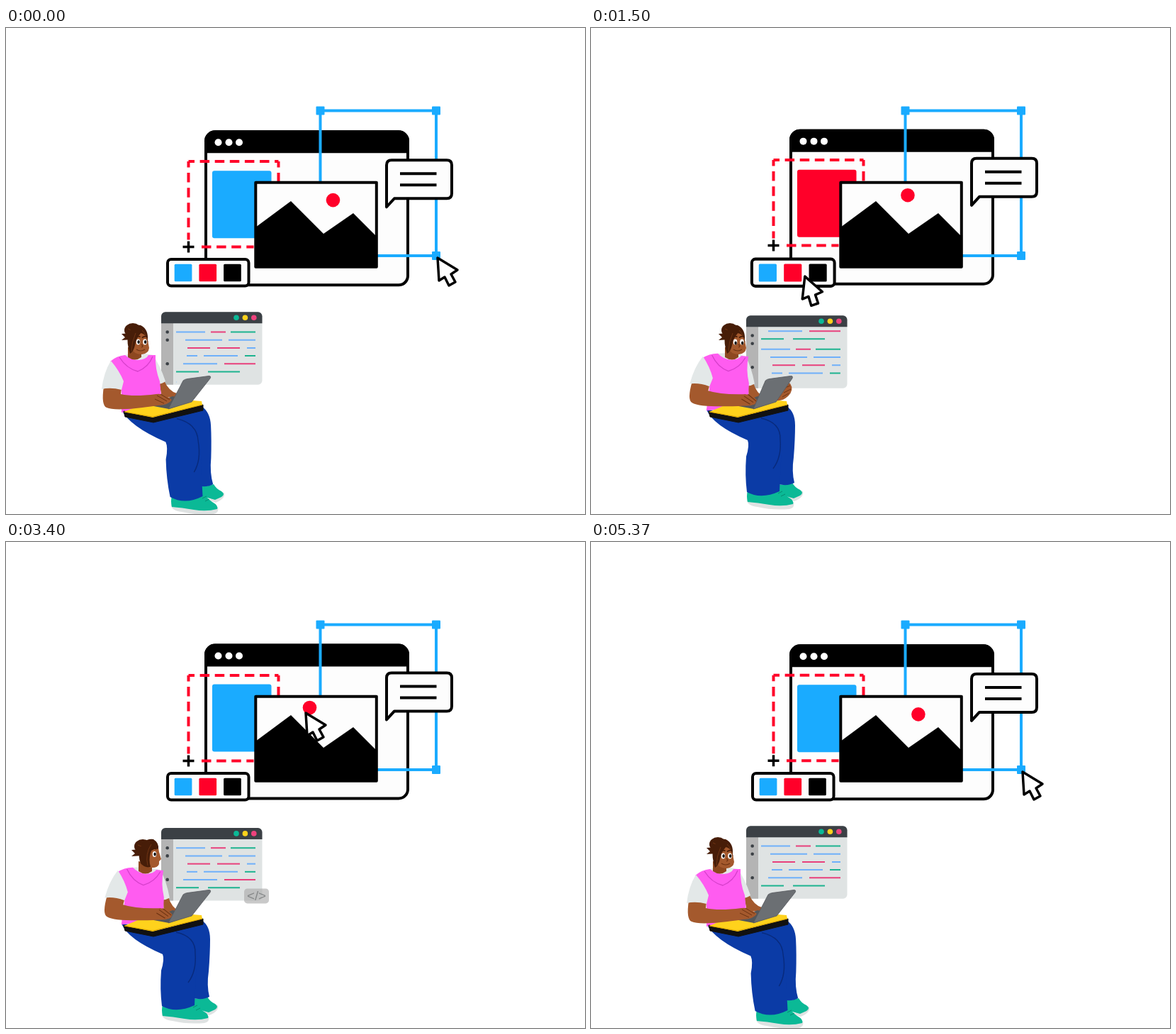
Write an HTML page with a canvas that moves like this. It is 817 by 685 pixels and loops after 5.41 s.

```html
<!DOCTYPE html>
<html lang="en">
<head>
<meta charset="utf-8">
<title>Design and code</title>
<style>
html, body { margin: 0; width: 100%; height: 100%; overflow: hidden; background: #fff; }
canvas { display: block; }
</style>
</head>
<body>
<canvas id="stage" width="817" height="685"></canvas>
<script>
const c = document.getElementById('stage').getContext('2d');
const LOOP = 5410;
const BLUE = '#1aabff', RED = '#ff0029', INK = '#000', PAPER = '#fdfdfd';
const SKIN = '#a4592d', SKIN_LINE = '#6b3212', HAIR = '#471d08', PINK = '#ff5cf0', PINK_LINE = '#d63fcb';
const SHIRT = '#e3e8e8', JEANS = '#0b3ba6', JEANS_LINE = '#082a7c', TEAL = '#0bb996', SOLE = '#dfe2e2';
const SLATE = '#3b4045', YELLOW = '#ffd21c';
const CODE = { b: '#6fb0fa', p: '#e8407c', g: '#1db38f' };

const unit = v => Math.min(1, Math.max(0, v));

// Eased 0 to 1 between two times
function ramp(t, from, to) {
  const k = unit((t - from) / (to - from));
  return k * k * (3 - 2 * k);
}

// Rises between a and b, falls between d and e
const hill = (t, a, b, d, e) => ramp(t, a, b) - ramp(t, d, e);

// Sway that repeats a whole number of times in the loop
const wave = (t, cycles, degrees = 0) => Math.cos(2 * Math.PI * (cycles * t / LOOP + degrees / 360));

function draw(d, fill, stroke, width = 4) {
  const p = new Path2D(d);
  if (fill) { c.fillStyle = fill; c.fill(p); }
  if (stroke) { c.strokeStyle = stroke; c.lineWidth = width; c.stroke(p); }
}

function box(x, y, w, h, r, fill, stroke, width = 4) {
  c.beginPath();
  c.roundRect(x, y, w, h, r);
  if (fill) { c.fillStyle = fill; c.fill(); }
  if (stroke) { c.strokeStyle = stroke; c.lineWidth = width; c.stroke(); }
}

function dot(x, y, rx, fill, ry = rx) {
  c.beginPath();
  c.ellipse(x, y, rx, ry, 0, 0, 7);
  c.fillStyle = fill;
  c.fill();
}

function at(x, y, paint, angle = 0, scale = 1) {
  c.save();
  c.translate(x, y);
  c.rotate(angle * Math.PI / 180);
  c.scale(scale, scale);
  paint();
  c.restore();
}

// Skews a drawing around a fixed point
function lean(x, y, down, across, stretch, paint) {
  c.save();
  c.translate(x, y);
  c.transform(1, down, across, stretch, 0, 0);
  c.translate(-x, -y);
  paint();
  c.restore();
}

function designWindow(t) {
  const fill = t < 850 || t >= 2650 ? BLUE : t < 1620 ? RED : INK;
  at(0, 158 + 3.3 * wave(t, 3), () => {
    box(282, -15, 285, 216, 13, PAPER, INK);
    box(280, -17, 289, 32, [15, 15, 0, 0], INK);
    for (const x of [299.5, 314.5, 329]) dot(x, 0, 5, '#fff');
    box(291, 40, 83.5, 95, 3, fill);
  });
}

function marquee(t) {
  at(257.5, 307.2 + 1.4 * wave(t, 5, -20), () => {
    c.setLineDash([13.5, 7.6]);
    c.lineDashOffset = 5;
    draw('M0-120.5H127M0-120.5V-10M127-120.5V-70', null, RED);
    c.lineDashOffset = 0;
    draw('M18.5 0H92', null, RED);
    c.setLineDash([]);
    draw('M-8 0H8M0-8V8', null, INK, 3.5);
  });
}

function selection(drag) {
  const r = 607 - 12 * drag, b = 321 - 9 * drag;
  draw(`M443.5 116.5H${r}V${b}H443.5Z`, null, BLUE);
  for (const [x, y] of [[443.5, 116.5], [r, 116.5], [r, b]]) box(x - 6, y - 6, 12, 12, 1, BLUE);
}

function picture(t) {
  // The sun drifts left until it is dragged back
  const x = 461.5 - .0097 * t + .0097 * LOOP * ramp(t, 3500, 4290);
  box(352, 218, 170.5, 119, 0, PAPER);
  dot(x, 233.5 + .0014 * Math.abs(x - 428) ** 2.5, 9.8, RED);
  draw('M352 281L402 244L448 290L490 261L523 294V337H352Z', INK);
  box(352.3, 217.8, 170.5, 119, 0, null, INK);
}

function bubble(t) {
  at(0, 204.8 + 2.6 * wave(t, 3, -80), () => {
    draw('M537 47V-12Q537-19 544-19H622Q629-19 629-12V28Q629 35 622 35H548Z', PAPER, INK);
    draw('M556 0H607.5M556 16H607.5', null, INK);
  });
}

function palette(t) {
  const pulse = [850, 1520, 2600].reduce((sum, click) => sum + Math.exp(-(((t - click) / 90) ** 2)), 0);
  at(285, 344.5, () => {
    box(-57, -18.5, 114.5, 37.5, 5, PAPER, INK);
    [BLUE, RED, INK].forEach((f, i) => box(-47.3 + i * 34.7, -11.8, 24.7, 24.5, 1.5, f));
  }, 0, 1 + .02 * pulse);
}

// Cursor moves: leave, arrive, x, y
const MOVES = [[0, 570, 285, 345], [1000, 1400, 301, 349], [2300, 2560, 248, 347],
  [2850, 3380, 422, 240], [3500, 4250, 471, 250], [4400, 4830, 608, 323]];

function cursor(t, drag) {
  let x = 608, y = 323;
  for (const [leave, arrive, toX, toY] of MOVES) {
    const k = ramp(t, leave, arrive);
    x += (toX - x) * k;
    y += (toY - y) * k;
  }
  at(x - 12 * drag, y - 9 * drag, () =>
    draw('M1 1L3 33L11 28L17 40L26 35L20 24L29 18Z', '#fff', INK, 3.5),
  10 * hill(t, 1200, 1400, 1600, 1900));
}

const ROWS = [
  'b240-281 p289-310 g317-352', 'b253-305 b314-352', 'p256-288 p298-330 b340-352',
  'b255-270 b279-327 g337-352', 'b250-298 p308-352', 'g240-272 g285-330'
].map(row => row.split(' ').map(s => [CODE[s[0]], ...s.slice(1).split('-').map(Number)]));

// Two copies of the listing: one scrolls away while the other is typed
function codeRows(scroll, typed) {
  for (const copy of [0, 1]) {
    let left = copy ? typed : Infinity;
    ROWS.forEach((row, i) => {
      const y = 28.3 + i * 11.2 + copy * 70.5 - scroll;
      for (const [ink, from, to] of row) {
        const len = Math.min(left, to - from);
        if (len > 0) draw(`M${from} ${y}h${len}`, null, ink, 2);
        left -= to - from;
      }
    });
  }
}

function badge(show) {
  c.globalAlpha = show;
  box(-19.5, -11.7, 39, 23.4, 5, '#adadad');
  c.fillStyle = '#66696b';
  c.font = '21px "Liberation Sans", Arial, sans-serif';
  c.textAlign = 'center';
  c.textBaseline = 'middle';
  c.fillText('</>', 0, 1);
}

function codeWindow(t) {
  const scroll = 72.5 * (.7 * unit(t / 2200) + .3 * ramp(t, 0, 2200)) - 2 * ramp(t, 2200, 2600);
  const typed = t * (.2535 - .0000176 * t);
  at(0, 402.8 - 2.6 * wave(t, 2), () => {
    box(219, 0, 142.5, 102.5, 6, '#dfe3e3');
    box(219, 10, 17, 92.5, [0, 0, 0, 6], '#b4b4b4');
    for (const y of [28.3, 39.5, 73]) dot(227.7, y, 2.3, SLATE);
    c.save();
    c.beginPath();
    c.rect(219, 16, 142, 86);
    c.clip();
    codeRows(scroll, typed);
    c.restore();
    box(219, 0, 142.5, 16, [6, 6, 0, 0], SLATE);
    [TEAL, YELLOW, '#ee427d'].forEach((f, i) => dot(325 + 12.4 * i, 8, 3.8, f));
    const show = hill(t, 3250, 3500, 4750, 4950);
    if (show > 0) at(353.5, 96, () => badge(show), 0, .7 + .3 * show);
  });
}

function shoe(x, y) {
  at(x, y, () => {
    draw('M0 13Q0 21 15 23Q36 28 60 26Q68 24 66 17Z', SOLE);
    draw('M1 0Q16 8 32 3Q42-3 47-4Q50 4 58 9Q67 14 65 19Q50 23 32 20Q15 17 1 16Q-1 8 1 0Z', TEAL);
    draw('M44 4L50 1M48 8L54 5', null, '#078a70', 1);
  });
}

function backShoe(x, y) {
  at(x, y, () => {
    draw('M12 22L23 26Q37 20 35 12Z', SOLE);
    draw('M0 2Q11 4 20 0Q24 7 31 10Q37 14 31 18L22 22L0 16Z', TEAL);
  });
}

function legs(t) {
  const k = 1 - hill(t, 0, 520, 4150, 4900);
  backShoe(264 + 9 * k, 641 + 2 * k);
  lean(163, 538, 0, .05 * k, 1 + .02 * k, () =>
    draw('M240 545L276 533Q288 541 288 560Q288 580 286 605Q283 625 287 641Q278 646 264 643Z', JEANS));
  shoe(220 + 13 * k, 652 + 7 * k);
  lean(163, 538, 0, .1 * k, 1 + .06 * k, () => {
    draw('M163 538Q172 560 221 581Q224 588 219 604Q217 630 220 654Q240 665 266 653Q267 630 268 612Q271 580 266 563Q256 550 240 545Z', JEANS);
    draw('M240 550Q268 556 267 580Q269 605 257 621', null, JEANS_LINE, 1.4);
  });
}

function eye(x, y, look) {
  dot(x, y, 2.8, '#fff', 4);
  dot(x + .6, y + look, 1.7, '#111', 2.5);
  draw(`M${x - 4} ${y - 6}q4-3 7-1`, null, HAIR, 1.8);
}

function bun(x, y) {
  dot(x, y, 12, HAIR, 10);
  draw(`M${x - 2} ${y + 4}l-14 1l5 5l-5 4l16-1Z`, HAIR);
  draw(`M${x - 7} ${y - 2}q8 5 13-4`, null, '#6f3413', 1);
}

function frontHead(look) {
  draw('M173 436Q178 424 190 426Q200 428 200 440L202 451Q201 459 192 460Q180 460 175 450Z', SKIN);
  bun(179, 426);
  draw('M175 459Q170 444 172 434Q177 417 190 419Q201 424 200 440Q197 431 190 430Q184 437 182 447Q180 456 175 459Z', HAIR);
  draw('M183 430Q177 443 177 456M192 426Q199 433 200 443', null, '#6f3413', 1);
  eye(186.5, 442.5, look);
  eye(196, 442.5, look);
  draw('M191 446Q195 449 191 450M184 453Q190 457 196 453', null, SKIN_LINE, 1.2);
}

function sideHead() {
  draw('M186 438Q190 423 205 425Q214 429 214 437L217 447L214 450Q215 458 207 459Q194 460 188 450Z', SKIN);
  bun(191, 429);
  draw('M188 453Q184 443 187 433Q192 417 206 419Q214 424 213 433Q205 429 202 438Q199 448 202 458Q194 460 188 453Z', HAIR);
  draw('M203 426Q194 440 198 456', null, '#6f3413', 1);
  eye(207.5, 440, 0);
}

function head(t, p) {
  const side = t > 2850 && t < 4450;
  const x = side ? 2 : 17 * p;
  at(x, 0, () => {
    const n = side ? 13 : 0;
    draw(`M${172 + n} 450V464Q${182 + n} 471 ${191 + n} 464V454Z`, '#8d4820');
    side ? sideHead() : frontHead(1.5 * p);
  });
}

function torso() {
  draw('M216 500L223 497Q230 512 241 515L240 521L220 520Z', SKIN);
  draw('M160 464Q180 455 208 461L212 500L170 500Z', SHIRT);
  draw('M207 461Q217 474 225 498Q220 502 213 502Z', SHIRT);
  draw('M147 470Q156 462 168 461Q176 468 187 468Q198 467 201 461L211 461Q210 480 217 498L220 530L163 542L163 510Q161 490 147 470Z', PINK);
  draw('M160 464Q170 480 186 484Q201 478 207 463', null, PINK_LINE, 1.3);
}

function arm(t) {
  const tap = Math.sin(t / 45) * .6;
  draw('M138 505Q134 532 142 535Q155 541 215 532Q230 531 234 524Q222 514 212 516Q180 520 162 516L163 507Z', SKIN);
  draw(`M213 ${518 + tap}L227 526M218 ${516 - tap}L231 524M210 523L223 529`, null, SKIN_LINE, 1);
  draw('M148 469Q138 485 135 509Q148 506 163 510L166 498Q160 483 148 469Z', SHIRT);
}

function board() {
  draw('M166 540L208 549L278 531V539L208 556L168 548Z', '#111', '#111', 1);
  draw('M167 541L214 521L276 526L277 531L207 549Z', YELLOW);
  draw('M167 541L207 548L277 531', null, '#e0a800', 1.2);
  draw('M203 532L235 519L262 526L230 537Z', '#53575b');
}

function grippingHand() {
  draw('M258 508Q272 497 281 501Q287 510 278 519Q268 528 258 524Z', SKIN);
  draw('M272 508L281 504M272 514L282 509M270 520L279 515', null, SKIN_LINE, 1);
}

function person(t) {
  const p = hill(t, 700, 1150, 4230, 4700);
  const lift = hill(t, 0, 600, 750, 1150);
  const grip = hill(t, 1150, 1350, 2700, 2950);
  const lid = -4 * hill(t, 300, 1000, 1600, 2200);
  const onBoard = paint => at(166, 540, () => { c.translate(-166, -540); paint(); }, -3 * lift);
  const pose = paint => lean(190, 540, .1 * p, -.14 * p, 1, paint);

  legs(t);
  pose(torso);
  head(t, p);
  onBoard(() => {
    board();
    c.globalAlpha = grip;
    at(7 * ramp(t, 1500, 2200), 0, grippingHand);
    c.globalAlpha = 1;
  });
  at(4 * lift, -2 * p, () => pose(() => arm(t)));
  onBoard(() => lean(229, 537, 0, -lid / 42, 1, () =>
    draw('M229 537L250 497Q252 495 256 494.5L286 490.5Q290 490 288 494L262 527Z', '#6b6f73', '#56595d', .8)));
}

function frame() {
  const t = (performance.now() - start) % LOOP;
  const drag = hill(t, 4830, 5010, 5020, 5250);
  c.fillStyle = '#fff';
  c.fillRect(0, 0, 817, 685);
  c.lineJoin = 'round';
  designWindow(t);
  marquee(t);
  selection(drag);
  picture(t);
  bubble(t);
  palette(t);
  cursor(t, drag);
  codeWindow(t);
  person(t);
  requestAnimationFrame(frame);
}

const start = performance.now();
frame();
</script>
</body>
</html>
```
